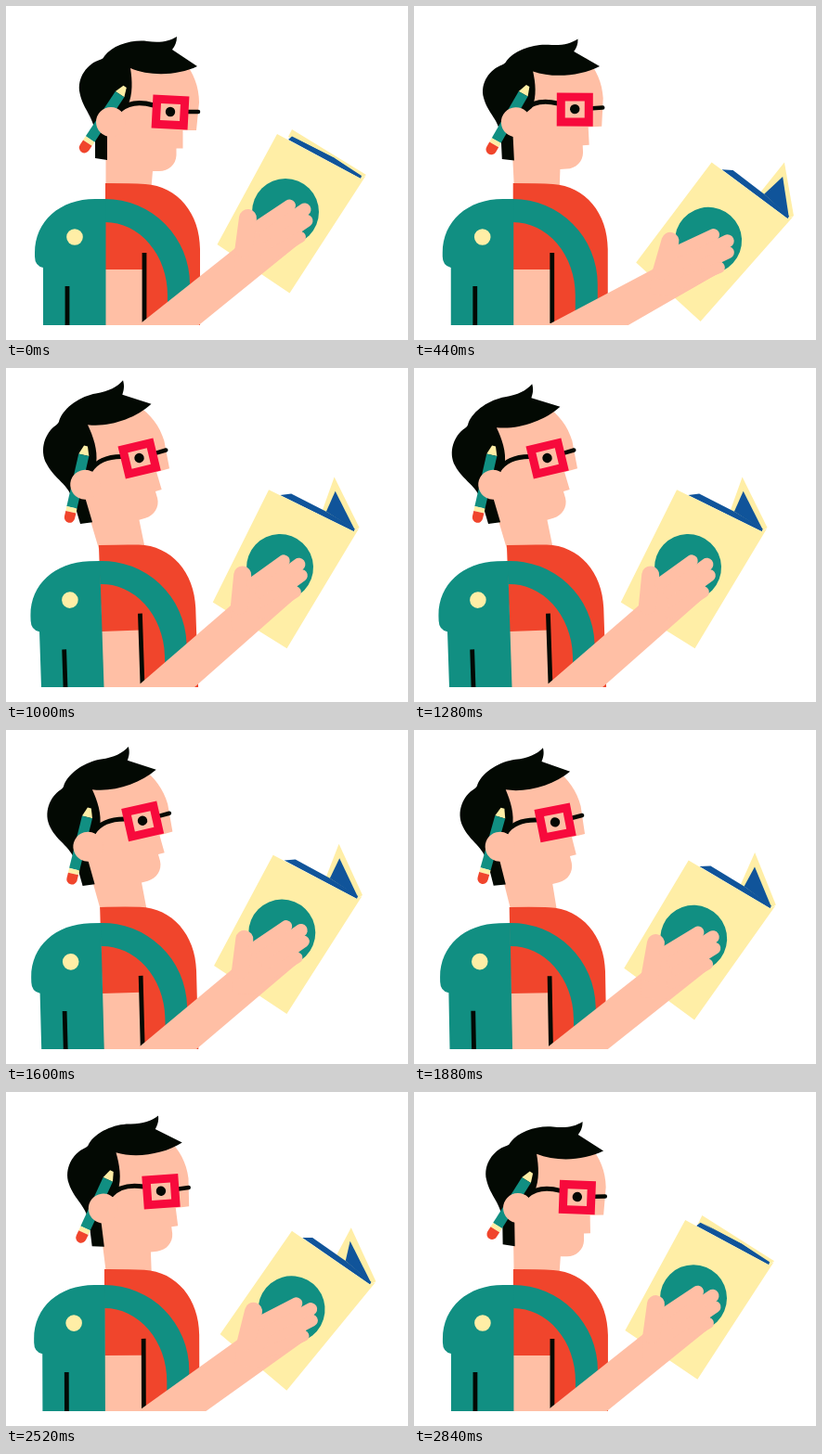
Animation of 433x360 px, one loop 2880 ms. Source, as an HTML page with a canvas:

```html
<!DOCTYPE html>
<html lang="en">
<head>
<meta charset="utf-8">
<title>Student reading</title>
<style>
  html, body { margin: 0; width: 100%; height: 100%; overflow: hidden; background: #fff; }
  canvas { display: block; width: 433px; height: 360px; }
</style>
</head>
<body>
<canvas></canvas>
<script>
const LOOP = 2880, STEP = 40, GROUND = 344;
const TEAL = '#118f82', RED = '#f0452c', SKIN = '#ffbfa5', INK = '#030903',
      CREAM = '#ffeea6', BLUE = '#10549a', FRAME = '#f70a3c';

const canvas = document.querySelector('canvas');
const ctx = canvas.getContext('2d');
const density = window.devicePixelRatio || 1;
canvas.width = Math.round(433 * density);
canvas.height = Math.round(360 * density);

const rad = degrees => degrees * Math.PI / 180;
const mix = (a, b, k) => a + (b - a) * k;
const progress = (from, to, t) => Math.min(1, Math.max(0, (t - from) / (to - from)));
const ease = (from, to, t) => {
  const u = progress(from, to, t);
  return u * u * (3 - 2 * u);
};
const hump = (from, peak, to, t) => ease(from, peak, t) - ease(peak, to, t);

function poseAt(t) {
  const lean = ease(340, 820, t) - progress(1280, LOOP, t) ** 1.4; // leaning back
  const lift = lean * (1.6 - .6 * lean);
  const dip = hump(0, 380, 750, t);         // book sinks while it opens
  const sag = hump(1280, 2450, LOOP, t);    // and again before it closes
  const open = ease(0, 340, t) * (1 - ease(2400, 2900, t));
  return {
    head: [177 - 33.5 * lean, 114 - 17 * lift, -16.5 * lift],
    hairStretch: 1 - .042 * Math.sin(2 * Math.PI * progress(220, 1120, t)),
    pencilSwing: 7.5 * Math.sin(Math.PI * progress(440, 1000, t)) - 4.2 * lift,
    body: [105 - 2 * lean, 343, -1.9 * lean * lean],
    book: [
      301 + 18 * dip + 9 * sag - 6 * lean,
      222 + 34 * dip + 15.5 * sag - 7 * lean,
      9.4 * dip + 7.5 * sag - 2 * lean
    ],
    open,
    corner: [308 + 55 * open + 7 * dip, 133 - 6.5 * open]
  };
}

function fill(color, path) {
  ctx.fillStyle = color;
  ctx.fill(new Path2D(path));
}

function stroke(color, width, path, cap = 'butt') {
  ctx.strokeStyle = color;
  ctx.lineWidth = width;
  ctx.lineCap = cap;
  ctx.stroke(new Path2D(path));
}

function disc(color, x, y, r) {
  ctx.fillStyle = color;
  ctx.beginPath();
  ctx.arc(x, y, r, 0, 2 * Math.PI);
  ctx.fill();
}

const polygon = (color, ...points) => fill(color, 'M' + points.join('L') + 'Z');

// Moves the rest point (px, py) to (x, y) and turns around it
function posed([x, y, angle], px, py, draw) {
  ctx.save();
  ctx.translate(x, y);
  ctx.rotate(rad(angle));
  ctx.translate(-px, -py);
  draw();
  ctx.restore();
}

function drawPencil() {
  polygon(CREAM, [-41, -2], [-31, -5.7], [-31, 5.7], [-41, 2]);
  fill(TEAL, 'M-31-5.7H27V5.7H-31Z');
  fill(CREAM, 'M27-5.7H32V5.7H27Z');
  fill(RED, 'M32-5.7H38A5.7 5.7 0 0 1 38 5.7H32Z');
}

function drawHead(hairStretch, pencilSwing) {
  fill(SKIN, 'M128 60H192C202 72 208 87 208 104L205 134H190.5V153.5H183.5V161'
    + 'C183 171 175 178 165 178H158L154 225H107.5V110Z');
  ctx.save();
  ctx.translate(0, 166);
  ctx.scale(1, hairStretch);
  ctx.translate(0, -166);
  fill(INK, 'M184 33C176 38 166 40 152 38C136 36 115 42 106 54C105 56 104 57 101 58'
    + 'C88 62 76 77 79.5 94C83 112 96 120 96 141V164L109 166V138L126 112L131 108'
    + 'C137 95 136 80 134 67C155 76 185 75 206 65L179 47C182 43 184 39 184 33Z');
  ctx.restore();
  posed([105.5, 121, 123.5 + pencilSwing], 0, 0, drawPencil);
  disc(SKIN, 113, 125, 16);
  stroke(INK, 5, 'M123 112C132 104 145 103 159 107');
  stroke(INK, 4.5, 'M196 114H207', 'round');
  posed([177, 114.5, 3], 0, 0, () => stroke(FRAME, 9, 'M-15-13.5H15V13.5H-15Z'));
  disc(INK, 177, 114, 5.2);
}

function drawBody() {
  fill(RED, 'M107 191Q135 191 150 192C185 194 209 224 209 262V364H107Z');
  fill(SKIN, 'M107 284H149V364H107Z');
  fill(TEAL, 'M107 208A91 92 0 0 1 198 300V364H174V312A67 79 0 0 0 107 233Z');
  fill(TEAL, 'M40 364V282Q31 280 31 270V266C31 232 58 208 96 208H107.5V364Z');
  stroke(INK, 4.8, 'M66 302V364M149 266V342');
  disc(CREAM, 74, 249, 8.8);
}

function drawBook(open, [cornerX, cornerY]) {
  const edge = [382, 186], notch = [353, 163.5];
  polygon(CREAM, [cornerX, cornerY], [388, 182], edge, [mix(304, 349, open), mix(141, 162, open)]);
  polygon(BLUE, [304, 144], [mix(308, 316, open), mix(140.5, 143, open)], notch, [383, 183], edge);
  polygon(BLUE, notch, [cornerX + .5, cornerY + 8 + 7.5 * open], [383, 184]);
  polygon(CREAM, [292, 138], edge, [387.5, 183], [305.5, 309.5], [227.5, 257]);
  disc(TEAL, 301, 222, 36);
}

function drawHand() {
  polygon(SKIN, [246, 262], [268, 236], [302, 212], [318, 225], [319, 245], [321, 252], [275, 288], [247, 288]);
  stroke(SKIN, 19, 'M260.5 228.5L256 262', 'round');
  stroke(SKIN, 13, 'M271 238L305.5 215', 'round');
  stroke(SKIN, 14, 'M280 248L321.5 219.5', 'round');
  stroke(SKIN, 13, 'M285 258L324 231.5', 'round');
  stroke(SKIN, 12, 'M280 271L317 249', 'round');
}

function drawForearm([x, y, angle], shift) {
  const c = Math.cos(rad(angle)), s = Math.sin(rad(angle));
  const wrist = (dx, dy) => [x + dx * c - dy * s, y + dx * s + dy * c];
  polygon(SKIN, [140 + shift, 346], wrist(-54, 39), wrist(20, 30), [151, 390]);
}

function render(now) {
  const pose = poseAt(Math.floor(now % LOOP / STEP) * STEP);
  ctx.setTransform(density, 0, 0, density, 0, 0);
  ctx.fillStyle = '#fff';
  ctx.fillRect(0, 0, 433, 360);
  ctx.save();
  ctx.beginPath();
  ctx.rect(0, 0, 433, GROUND);
  ctx.clip();
  posed(pose.head, 177, 114, () => drawHead(pose.hairStretch, pose.pencilSwing));
  posed(pose.body, 105, 343, drawBody);
  posed(pose.book, 301, 222, () => drawBook(pose.open, pose.corner));
  drawForearm(pose.book, pose.body[0] - 105);
  posed(pose.book, 301, 222, drawHand);
  ctx.restore();
}

const start = performance.now();
function tick() {
  render(performance.now() - start);
  requestAnimationFrame(tick);
}
tick();
</script>
</body>
</html>
```
